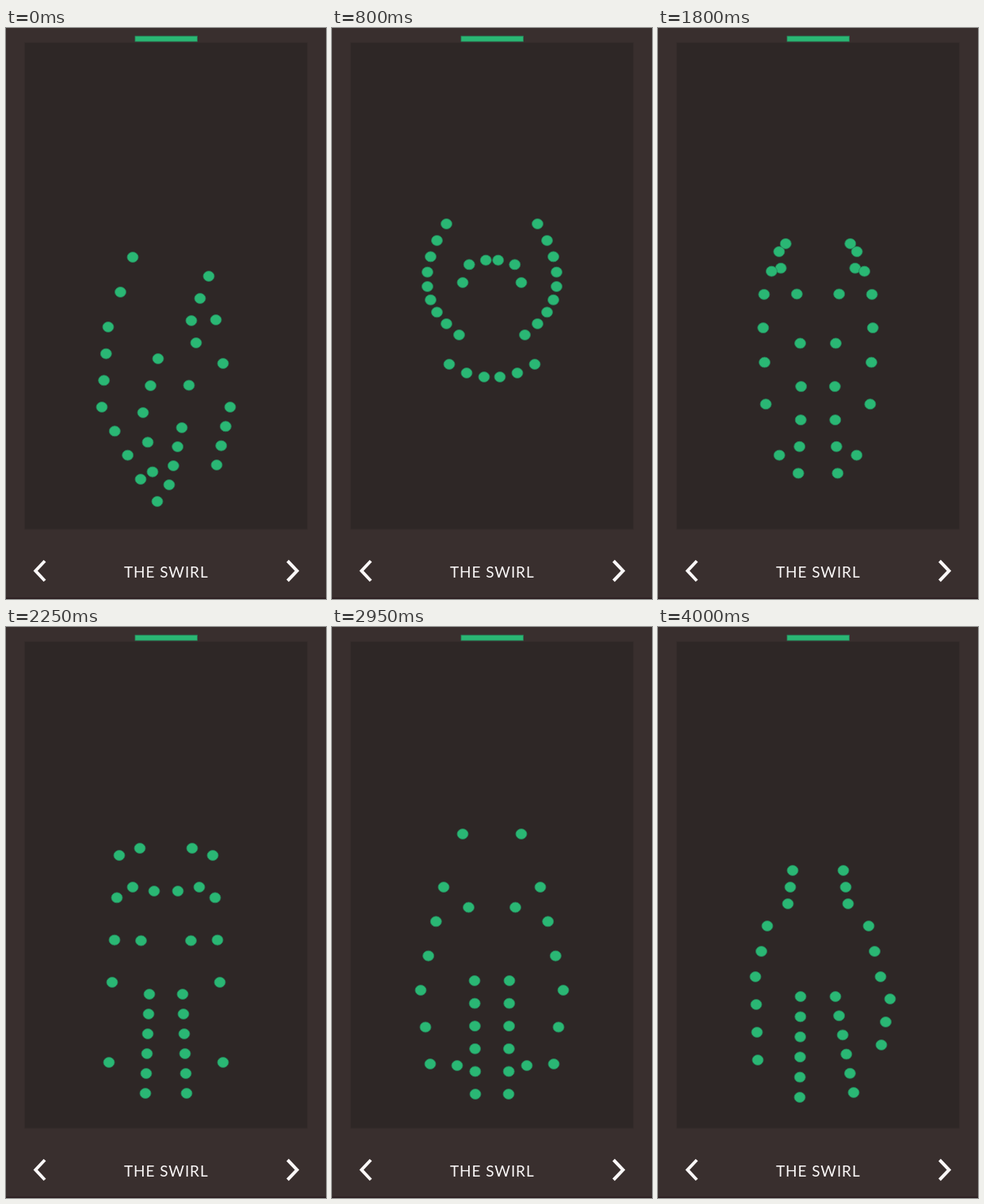
An HTML page that plays this animation: 404x720 px, repeating every 4.05 s.

```html
<!DOCTYPE html>
<html lang="en">
<head>
<meta charset="utf-8">
<title>Dot fountain</title>
<style>
  html, body { margin: 0; width: 100%; height: 100%; overflow: hidden; background: #392f2e; }
  svg { display: block; width: 404px; height: 720px; }
  text { font: 19px Lato, "Open Sans", sans-serif; letter-spacing: .9px; fill: #fbf8f8; }
  .chevron { fill: none; stroke: #fbf8f8; stroke-width: 4; }
  .green { fill: #2ab774; stroke: #268258; stroke-width: .8; }
</style>
</head>
<body>
<svg viewBox="0 0 404 720">
  <rect width="404" height="720" fill="#392f2e"/>
  <rect y="718.5" width="404" height="1.5" fill="#2b1d1f"/>
  <rect x="23.5" y="18.5" width="357" height="613.5" fill="#2e2726" stroke="#342b2a"/>
  <rect class="green" x="163" y="10.2" width="78.4" height="6.8"/>
  <g id="dots"></g>
  <path class="chevron" d="M49 672 37.3 684.5 49 697"/>
  <path class="chevron" d="M355.5 672 367.5 684.5 355.5 697"/>
  <text x="149" y="693">THE SWIRL</text>
</svg>
<script>
const LOOP = 4050, TICK = 50, COUNT = 15, WIDTH = 404;
const mix = (a, b, k) => a + (b - a) * k;
const mixPoint = (p, q, k) => [mix(p[0], q[0], k), mix(p[1], q[1], k)];
const mirror = ([x, y]) => [WIDTH - x, y];
const chain = place => Array.from({ length: COUNT }, (_, i) => place(i));

// Spreads dots evenly between key dots: { index: [x, y] }
function spread(keys) {
  const ids = Object.keys(keys).map(Number);
  return chain(i => {
    const end = Math.max(1, ids.findIndex(id => id >= i));
    const a = ids[end - 1], b = ids[end];
    return mixPoint(keys[a], keys[b], (i - a) / (b - a));
  });
}

// Three arcs: a bowl below, a small cap inside and a horseshoe around it
function rings(i) {
  const cap = i - 3, shoe = i - 6;
  if (i < 3) return [148 + 22 * i, 424 + 14 * i - 3 * i * i];
  if (i < 6) return [202 - 37 * Math.cos(.68 * cap), 321 - 29 * Math.sin(.9 * cap)];
  return [120 + 2 * (shoe - 3.5) ** 2, 247 + 17.5 * shoe + 9 * Math.sin(Math.PI * shoe / 8)];
}

// A fountain side rises through the middle, bends over the top and falls outside.
// The right side mirrors the left one, apart from its own key dots.
function fountain(time, shift, left, own = {}) {
  const right = {};
  for (const i in left) right[i] = mirror(left[i]);
  return { time, shift, sides: [spread(left), spread({ ...right, ...own })] };
}

const poses = [
  fountain(0, 0,
    { 0: [191, 597], 3: [173, 485], 5: [192, 417], 6: [160, 289], 8: [129, 377], 11: [121, 478], 14: [170, 569] },
    { 0: [206, 576], 3: [222, 504], 5: [240, 397], 6: [234, 369], 8: [256, 313], 14: [266, 551] }),
  { time: 800, shift: 3, sides: [chain(rings), chain(i => mirror(rings(i)))] },
  fountain(1400, 5,
    { 0: [177, 564], 3: [183, 440], 5: [177, 280], 6: [170, 246], 7: [138, 254], 11: [125, 377], 14: [143, 481] }),
  fountain(2250, 8,
    { 0: [176, 588], 5: [181, 463], 7: [160, 328], 8: [187, 333], 9: [169, 279], 10: [143, 288], 13: [134, 448], 14: [130, 549] }),
  fountain(2950, 11,
    { 0: [181, 589], 5: [180, 446], 7: [165, 261], 8: [141, 328], 11: [112, 458], 13: [124, 551], 14: [158, 553] }),
  fountain(3450, 13,
    { 0: [193, 583], 1: [163, 564], 5: [181, 454], 6: [187, 395], 7: [151, 295], 10: [127, 412], 12: [112, 488], 14: [156, 584] }),
  fountain(4000, 15,
    { 0: [179, 593], 5: [180, 466], 6: [170, 307], 8: [164, 349], 9: [138, 377], 11: [123, 441], 14: [126, 546] },
    { 0: [247, 587], 12: [293, 469], 14: [282, 527] })
];

function along(points, u) {
  const i = Math.floor(u);
  return mixPoint(points[i], points[(i + 1) % COUNT], u - i);
}

const group = document.getElementById("dots");
const dots = Array.from({ length: 2 * COUNT }, () => {
  const dot = document.createElementNS("http://www.w3.org/2000/svg", "ellipse");
  dot.setAttribute("class", "green");
  dot.setAttribute("rx", 7);
  dot.setAttribute("ry", 6.5);
  return group.appendChild(dot);
});

function draw(time) {
  let n = 0;
  while (n < poses.length - 2 && time >= poses[n + 1].time) n++;
  const from = poses[n], to = poses[n + 1];
  const k = Math.min(1, (time - from.time) / (to.time - from.time));
  const shift = mix(from.shift, to.shift, k);
  const lift = 36 * Math.sin(Math.PI * shift) ** 2;

  dots.forEach((dot, j) => {
    const side = Math.floor(j / COUNT);
    const u = (j + shift) % COUNT;
    const [x, y] = mixPoint(along(from.sides[side], u), along(to.sides[side], u), k);
    const arch = lift * Math.exp(-((u - 6.5) ** 2));
    dot.setAttribute("cx", x.toFixed(2));
    dot.setAttribute("cy", (y - arch).toFixed(2));
  });
}

const start = performance.now();
function frame() {
  const time = (performance.now() - start) % LOOP;
  draw(Math.floor(time / TICK) * TICK);
  requestAnimationFrame(frame);
}
frame();
</script>
</body>
</html>
```
